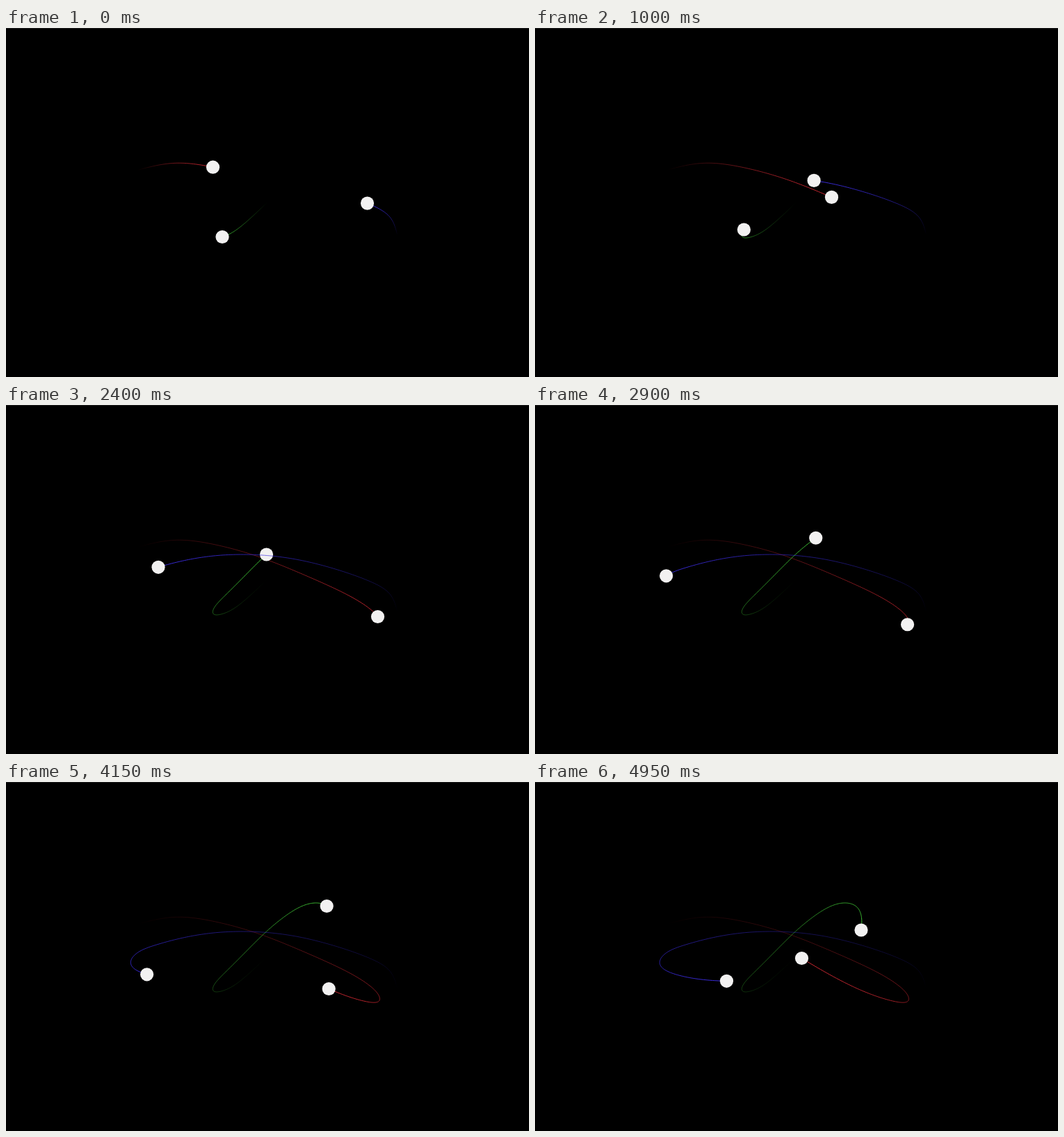
Animation, 752 px wide and 502 px high, one loop 5000 ms. Source, as an HTML page with a canvas:

```html
<!DOCTYPE html>
<html lang="en">
<head>
<meta charset="utf-8">
<title>Three bodies</title>
<style>
  html, body { margin: 0; width: 100%; height: 100%; overflow: hidden; background: #000; }
  canvas { display: block; }
</style>
</head>
<body>
<canvas id="stage" width="752" height="502"></canvas>
<script>
const ctx = document.getElementById('stage').getContext('2d');
const LOOP = 5000, STEP = 50;
const START = -1.1, SEGMENT = 0.025, RADIUS = 9.6;

// Seconds, then x and y of the first two bodies.
const knots = [
  [START, 190.5, 204,   375,   251.5],
  [-0.5,  244.5, 194.3, 333.5, 288.7],
  [0,     297.5, 200.2, 311,   300.5],
  [0.5,   361.5, 217.7, 298.7, 300.8],
  [1,     426.5, 243.4, 300.4, 290],
  [1.65,  495,   275.2, 328,   261.2],
  [2.4,   534.5, 304.5, 374.5, 215],
  [2.75,  537.2, 313.5, 395.3, 197.5],
  [3.45,  516,   315.4, 432.5, 176],
  [4.15,  464.2, 297.5, 461.2, 178.5],
  [4.95,  383.5, 253.5, 469,   213],
  [5.4,   332,   221,   462,   247]
];
const times = knots.map(k => k[0]);

// Natural cubic spline through one column of the table.
function spline(col) {
  const y = knots.map(k => k[col]), n = y.length;
  const bend = Array(n).fill(0), c = Array(n).fill(0), d = Array(n).fill(0);
  for (let i = 1; i < n - 1; i++) {
    const h0 = times[i] - times[i - 1], h1 = times[i + 1] - times[i];
    const rhs = 6 * ((y[i + 1] - y[i]) / h1 - (y[i] - y[i - 1]) / h0);
    const pivot = 2 * (h0 + h1) - h0 * c[i - 1];
    c[i] = h1 / pivot;
    d[i] = (rhs - h0 * d[i - 1]) / pivot;
  }
  for (let i = n - 2; i > 0; i--) bend[i] = d[i] - c[i] * bend[i + 1];
  return t => {
    let i = 0;
    while (i < n - 2 && t > times[i + 1]) i++;
    const h = times[i + 1] - times[i];
    const b = (t - times[i]) / h, a = 1 - b;
    return a * y[i] + b * y[i + 1] +
      ((a ** 3 - a) * bend[i] + (b ** 3 - b) * bend[i + 1]) * h * h / 6;
  };
}

const [rx, ry, gx, gy] = [1, 2, 3, 4].map(spline);
const bodies = [
  { color: 'rgb(205,40,50)', at: t => [rx(t), ry(t)] },
  { color: 'rgb(65,200,55)', at: t => [gx(t), gy(t)] },
  // The centre of mass stays put, which fixes the third body.
  { color: 'rgb(60,45,225)', at: t => [1128 - rx(t) - gx(t), 752.8 - ry(t) - gy(t)] }
];

function drawTrail(body, now) {
  const count = Math.round((now - START) / SEGMENT);
  ctx.strokeStyle = body.color;
  ctx.lineWidth = 1;
  let from = body.at(START);
  for (let i = 1; i <= count; i++) {
    const to = body.at(START + i * SEGMENT);
    ctx.globalAlpha = i / count;
    ctx.beginPath();
    ctx.moveTo(...from);
    ctx.lineTo(...to);
    ctx.stroke();
    from = to;
  }
  ctx.globalAlpha = 1;
}

function drawBall(body, now) {
  ctx.fillStyle = '#f2f1f1';
  ctx.beginPath();
  ctx.arc(...body.at(now), RADIUS, 0, 2 * Math.PI);
  ctx.fill();
}

function draw(ms) {
  const now = Math.floor((ms % LOOP) / STEP) * STEP / 1000;
  ctx.fillStyle = '#000';
  ctx.fillRect(0, 0, 752, 502);
  ctx.fillStyle = '#1c1c1c';
  ctx.fillRect(0, 0, 752, 1);
  for (const body of bodies) {
    drawTrail(body, now);
    drawBall(body, now);
  }
}

const begin = performance.now();
function tick() {
  draw(performance.now() - begin);
  requestAnimationFrame(tick);
}
tick();
</script>
</body>
</html>
```
